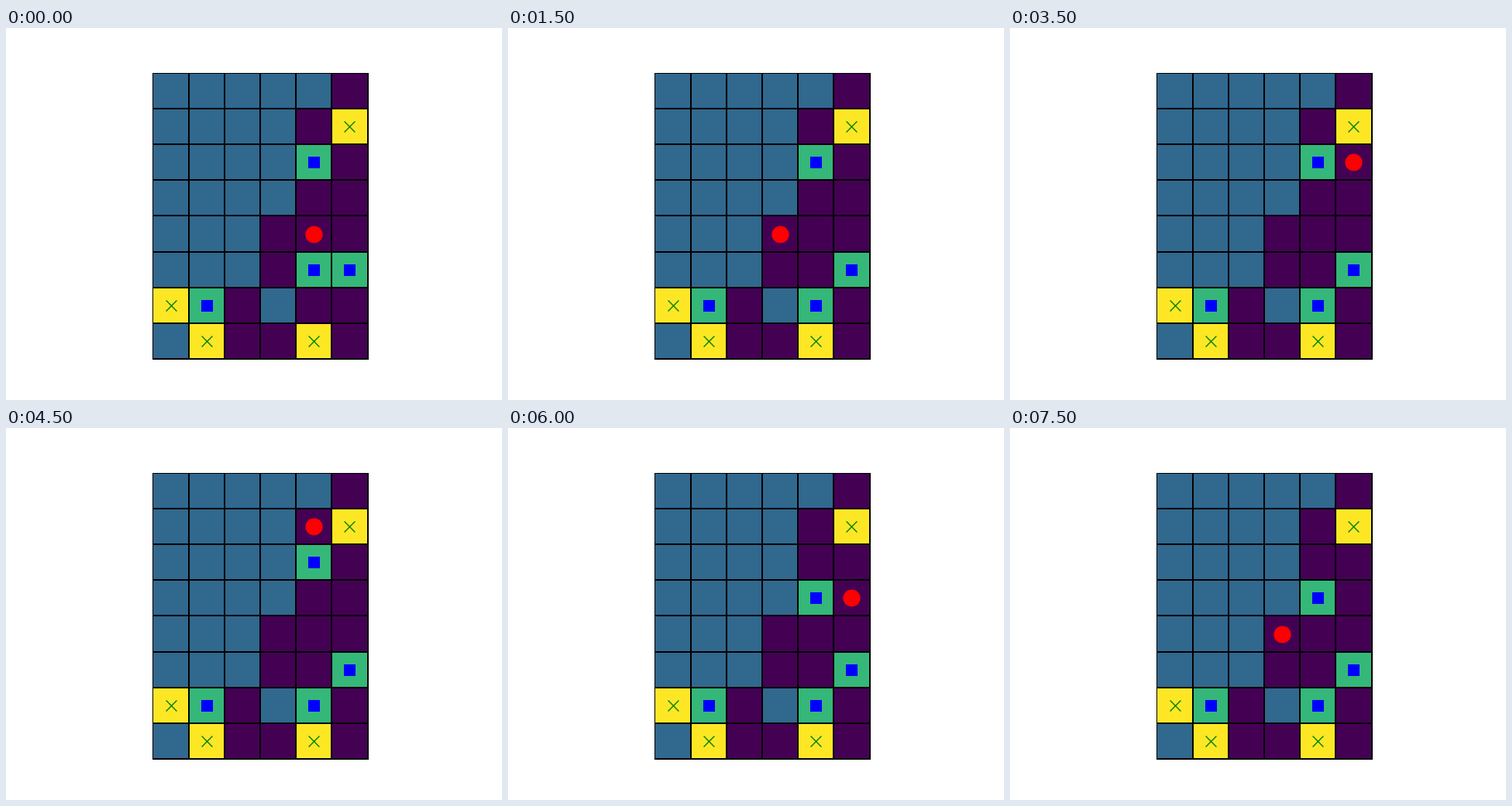
Animation of 640 by 480 pixels, one loop 8000 ms. Source, as an HTML page:

```html
<!DOCTYPE html>
<html lang="en">
<head>
<meta charset="utf-8">
<title>Box pushing puzzle</title>
<style>
  html, body { margin: 0; width: 100%; height: 100%; overflow: hidden; background: #fff; }
  svg { display: block; }
</style>
</head>
<body>
<svg id="stage" width="640" height="480" viewBox="0 0 640 480">
  <clipPath id="board"><rect x="189" y="58" width="279" height="370"/></clipPath>
</svg>
<script>
const STEP = 500, LOOP = 8000;
const LEFT = 189.4, TOP = 57.6, CELL = 46.2;
const COLORS = { '.': '#440154', '#': '#31688e', box: '#35b779', x: '#fde725' };

// '#' wall, '.' floor, 'x' goal
const MAP = [
  '#####.',
  '####.x',
  '####..',
  '####..',
  '###...',
  '###...',
  'x..#..',
  '#x..x.'
];
const START = [4, 4];
const MOVES = 'DLURRUUULDRDDLL';
const DIRECTIONS = { U: [0, -1], D: [0, 1], L: [-1, 0], R: [1, 0] };
const BOXES = [[4, 2], [4, 5], [5, 5], [1, 6]];

const edgeX = col => Math.round(LEFT + CELL * col);
const edgeY = row => Math.round(TOP + CELL * row);
const centerX = col => 213.5 + 46 * col;
const centerY = row => Math.floor(TOP + CELL * (row + 0.5) + 0.501) + 0.5;

const stage = document.getElementById('stage');

function add(parent, tag, attributes) {
  const node = document.createElementNS('http://www.w3.org/2000/svg', tag);
  for (const [key, value] of Object.entries(attributes)) node.setAttribute(key, value);
  return parent.appendChild(node);
}

function addCell(parent, col, row, fill) {
  const x = edgeX(col), y = edgeY(row);
  return add(parent, 'rect', { x, y, width: edgeX(col + 1) - x, height: edgeY(row + 1) - y, fill });
}

const board = add(stage, 'g', { 'clip-path': 'url(#board)' });
const floor = add(board, 'g', {});
const boxCells = add(board, 'g', {});
const grid = add(board, 'g', { stroke: '#000', 'stroke-width': 2 });
const markers = add(stage, 'g', {});
const boxMarkers = add(stage, 'g', {});
const player = add(stage, 'circle', { r: 11.1, fill: '#f00' });

MAP.forEach((line, row) => [...line].forEach((kind, col) => {
  addCell(floor, col, row, COLORS[kind]);
  if (kind === 'x') {
    const x = centerX(col), y = centerY(row), d = 6.94;
    add(markers, 'path', {
      d: `M${x - d} ${y - d}L${x + d} ${y + d}M${x - d} ${y + d}L${x + d} ${y - d}`,
      stroke: '#008000', 'stroke-width': 1.39
    });
  }
}));

for (let col = 0; col <= 6; col++) add(grid, 'path', { d: `M${edgeX(col)} 57V429` });
for (let row = 0; row <= 8; row++) add(grid, 'path', { d: `M188 ${edgeY(row)}H469` });

// Replays the first moves, pushing boxes on the way.
function stateAfter(count) {
  let [col, row] = START;
  const boxes = BOXES.map(box => [...box]);
  for (const move of MOVES.slice(0, count)) {
    const [dx, dy] = DIRECTIONS[move];
    col += dx;
    row += dy;
    const pushed = boxes.find(box => box[0] === col && box[1] === row);
    if (pushed) {
      pushed[0] += dx;
      pushed[1] += dy;
    }
  }
  return { col, row, boxes };
}

let shown = -1;

function render(time) {
  const step = Math.floor((time % LOOP) / STEP);
  if (step === shown) return;
  shown = step;
  const { col, row, boxes } = stateAfter(step);
  player.setAttribute('cx', centerX(col));
  player.setAttribute('cy', centerY(row));
  boxCells.replaceChildren();
  boxMarkers.replaceChildren();
  for (const [boxCol, boxRow] of boxes) {
    addCell(boxCells, boxCol, boxRow, COLORS.box);
    add(boxMarkers, 'rect', {
      x: centerX(boxCol) - 7.5, y: centerY(boxRow) - 7.5, width: 15, height: 15, fill: '#00f'
    });
  }
}

const begin = performance.now();
function tick() {
  render(performance.now() - begin);
  requestAnimationFrame(tick);
}
tick();
</script>
</body>
</html>
```
